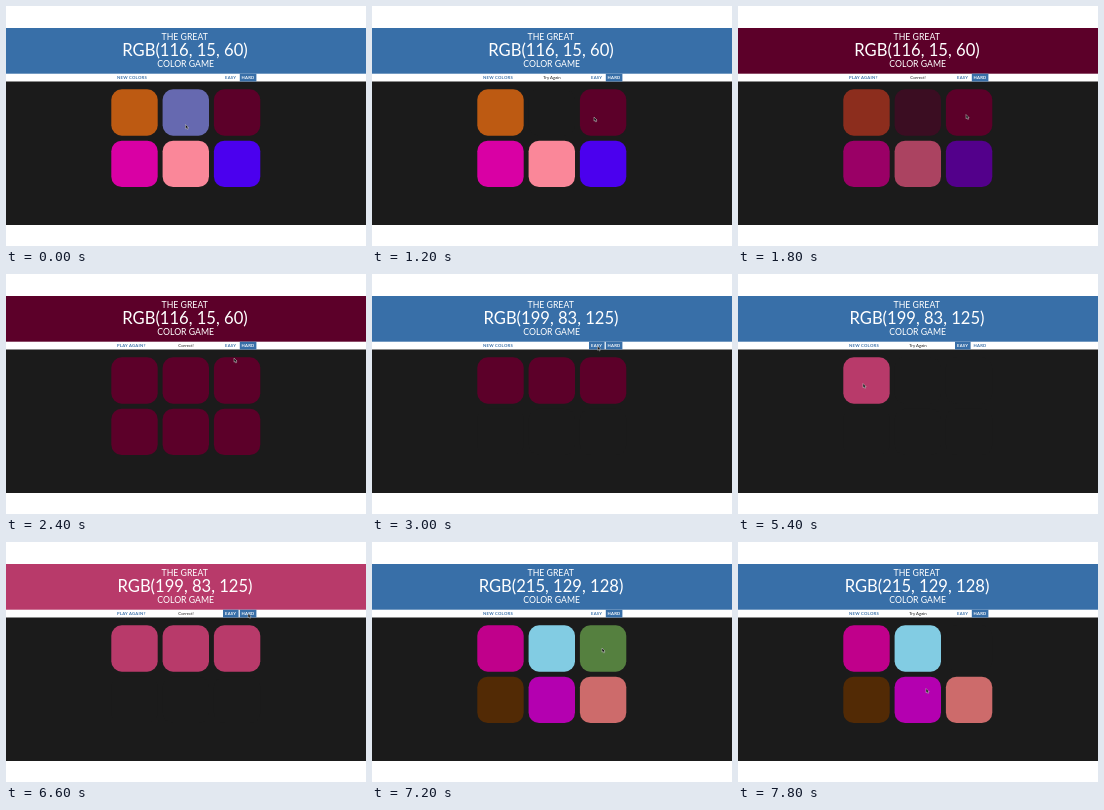
Write an HTML page that moves like this. It is 360 by 240 pixels and loops after 8000 ms.

```html
<!DOCTYPE html>
<html lang="en">
<head>
<meta charset="utf-8">
<title>Color game</title>
<style>
  html, body { margin: 0; width: 100%; height: 100%; overflow: hidden; background: #fff; }
  svg { display: block; width: 100vw; height: 100vh; }
  text { font-family: Lato, "Open Sans", sans-serif; text-anchor: middle; }
  .title { fill: #fff; font-size: 8.7px; }
  #goal { font-size: 16.6px; }
  .button { font-size: 4.2px; font-weight: 700; letter-spacing: .25px; text-anchor: start; }
  #message { font-size: 4.3px; fill: #222; }
</style>
</head>
<body>
<svg viewBox="0 0 360 240">
  <rect id="header" y="22" width="360" height="45.7"/>
  <rect y="75.5" width="360" height="143.5" fill="#1b1b1b"/>
  <text class="title" x="178.7" y="33.7">THE GREAT</text>
  <text class="title" id="goal" x="179" y="50"></text>
  <text class="title" x="179.7" y="61">COLOR GAME</text>
  <text class="button" id="reset" x="111" y="73.2" fill="#386fa8"></text>
  <text id="message" x="180" y="73.3"></text>
  <rect id="easyBox" x="217" y="67.7" width="15.6" height="7.8" fill="#386fa8"/>
  <rect id="hardBox" x="233.8" y="67.7" width="16.6" height="7.8" fill="#386fa8"/>
  <text class="button" id="easy" x="219" y="73.2">EASY</text>
  <text class="button" id="hard" x="235.5" y="73.2">HARD</text>
  <g id="squares"></g>
  <path id="cursor" d="M0 0V4.2L1 3.4 1.8 5 2.6 4.6 1.9 3.1H3.1Z" fill="#111" stroke="#ddd" stroke-width=".45"/>
</svg>
<script>
const $ = id => document.getElementById(id);
const BLUE = '#386fa8', DARK = '#1b1b1b', WINE = '#5c0029', ROSE = '#b83a6a';
const STEP = 600, LOOP = 8000;

// Halfway point of a color transition
const half = (a, b) => '#' + [1, 3, 5].map(i => {
  const sum = parseInt(a.slice(i, i + 2), 16) + parseInt(b.slice(i, i + 2), 16);
  return (sum >> 1).toString(16).padStart(2, '0');
}).join('');

const swap = (list, i, color) => list.map((c, k) => k === i ? color : c);
const fading = (list, i) => swap(list, i, half(list[i], DARK));
const gone = (list, i) => swap(list, i, DARK);
const toward = (list, color) => list.map(c => half(c, color));
const all = (n, color) => Array(n).fill(color);

const first = ['#bd5a12', '#6669b0', WINE, '#d900a4', '#fa8799', '#4b00ee'];
const second = [ROSE, '#8d451b', '#58f2a0'];
const third = ['#c0008b', '#82cce3', '#55803f', '#522a05', '#b400b0', '#cd6b6b'];
const firstMiss = gone(first, 1), secondMiss = gone(second, 1), lastMiss = gone(secondMiss, 2);

const goals = ['116, 15, 60', '199, 83, 125', '215, 129, 128'];
const AGAIN = 'Try Again', WON = 'Correct!';

// goal, message, lit buttons, cursor x, cursor y, squares
const steps = [
  [0, '', 'H', 179.5, 118.5, first],
  [0, AGAIN, 'H', 179.5, 118.5, fading(first, 1)],
  [0, AGAIN, 'H', 222, 111, firstMiss],
  [0, WON, 'H', 228, 108.5, toward(firstMiss, WINE)],
  [0, WON, 'H', 228, 84, all(6, WINE)],
  [1, '', 'EH', 225.5, 72, all(3, WINE)],
  [1, '', 'E', 201, 98, second],
  [1, AGAIN, 'E', 178, 110, fading(second, 1)],
  [1, AGAIN, 'E', 229, 110, fading(secondMiss, 2)],
  [1, AGAIN, 'E', 125, 109.5, lastMiss],
  [1, WON, 'E', 127, 109.5, toward(lastMiss, ROSE)],
  [1, WON, 'EH', 242, 71.5, all(3, ROSE)],
  [2, '', 'H', 230, 106, third],
  [2, AGAIN, 'H', 188, 146.5, gone(third, 2)]
];

const squares = Array.from({ length: 6 }, (_, i) => {
  const r = document.createElementNS('http://www.w3.org/2000/svg', 'rect');
  const box = { x: 105.3 + i % 3 * 51.3, y: 83.3 + (i > 2) * 51.4, width: 46.4, height: 46.4, rx: 10.5 };
  for (const key in box) r.setAttribute(key, box[key]);
  return $('squares').appendChild(r);
});

function light(name, on) {
  $(name + 'Box').style.display = on ? '' : 'none';
  $(name).style.fill = on ? '#fff' : BLUE;
}

function show([goal, message, lit, x, y, colors]) {
  const won = message === WON;
  $('header').style.fill = won ? [WINE, ROSE][goal] : BLUE;
  $('goal').textContent = `RGB(${goals[goal]})`;
  $('message').textContent = message;
  $('reset').textContent = won ? 'PLAY AGAIN?' : 'NEW COLORS';
  light('easy', lit.includes('E'));
  light('hard', lit.includes('H'));
  squares.forEach((s, i) => s.style.fill = colors[i] || DARK);
  $('cursor').setAttribute('transform', `translate(${x} ${y})`);
}

let start, current = -1;
function tick(now) {
  start ??= now;
  const i = Math.floor((now - start) % LOOP / STEP);
  if (i !== current) show(steps[current = i]);
  requestAnimationFrame(tick);
}
show(steps[0]);
requestAnimationFrame(tick);
</script>
</body>
</html>
```
